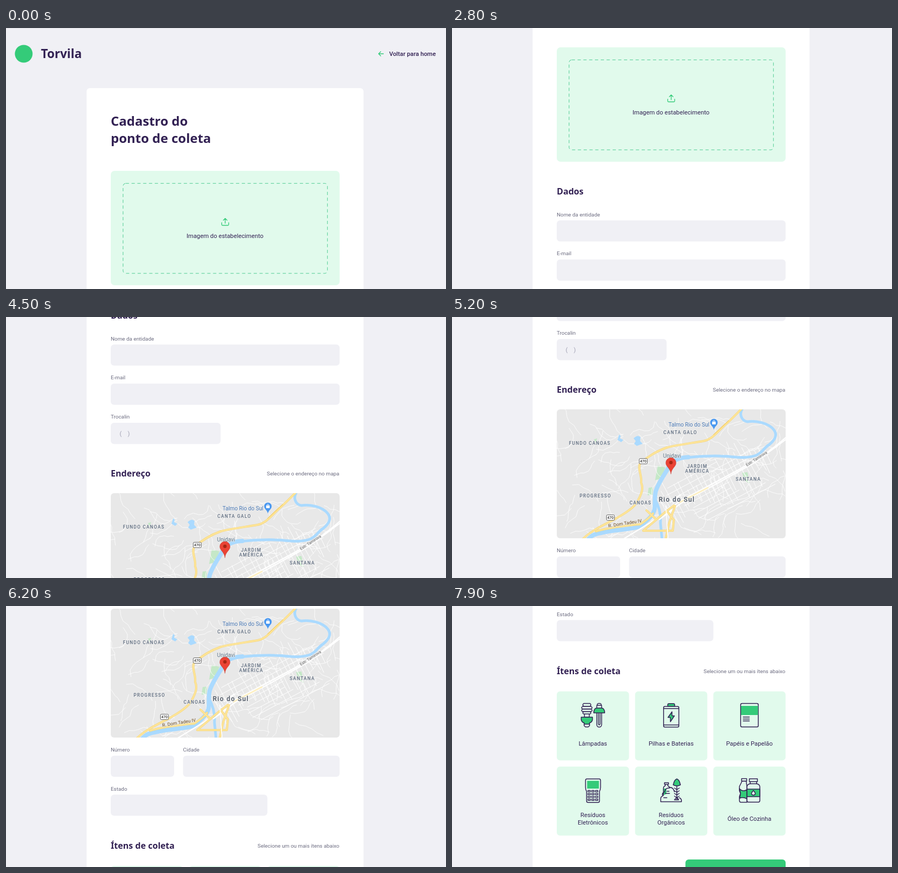
These frames come from a looping animation (819 by 486 pixels, 8 s). An HTML page:

```html
<!DOCTYPE html>
<html lang="pt-BR">
<head>
<meta charset="utf-8">
<title>Cadastro do ponto de coleta</title>
<style>
  html, body { margin: 0; width: 100%; height: 100%; overflow: hidden; background: #f0f0f5; }
  svg { display: block; width: 819px; height: 486px; }
  text { font-family: Roboto, sans-serif; white-space: pre; }
  .title { font: 700 24px "Noto Sans", sans-serif; fill: #322153; }
  .brand { font: 700 22.6px "Noto Sans", sans-serif; fill: #322153; }
  .head { font: 700 16.1px "Noto Sans", sans-serif; fill: #322153; }
  .label { font-size: 9.88px; fill: #6c6c80; }
  .body { font-size: 11.3px; fill: #322153; }
  .mid { text-anchor: middle; }
  .end { text-anchor: end; }
  .field { fill: #f0f0f5; }
  .mint { fill: #e1faec; }
  .ink { fill: none; stroke: #322153; stroke-width: 1.5; stroke-linejoin: round; stroke-linecap: round; }
  .ink .g { fill: #34cb79; }
  .ink .m { fill: #e1faec; }
  .line { fill: none; stroke: #34cb79; stroke-width: 1.3; stroke-linecap: round; stroke-linejoin: round; }
  .map path, .map use { fill: none; stroke-linejoin: round; stroke-linecap: round; }
  .map .park { fill: #c5e8c7; }
  .map .water { stroke: #aadaff; }
  .map .pond { fill: #aadaff; }
  .map .street { stroke: #fff; }
  .map .edge { stroke: #f7d679; stroke-width: 4; }
  .map .road { stroke: #fde59a; stroke-width: 2.6; }
  .map text { text-anchor: middle; paint-order: stroke; stroke: #ececec; stroke-width: 1.6px; stroke-linejoin: round; }
  .area { font-size: 8.4px; font-weight: 500; letter-spacing: 1.25px; fill: #5d6b7e; }
  .city { font-size: 12px; font-weight: 500; letter-spacing: 1.35px; fill: #4b5563; }
  .way { font-size: 8.6px; fill: #6b4a1d; }
  .poi { font-size: 10.2px; fill: #4a79b5; }
  .map .num { font-size: 7px; font-weight: 500; fill: #333; stroke: none; }
</style>
</head>
<body>
<svg viewBox="0 0 819 486">
  <defs>
    <clipPath id="frame"><rect x="195" y="172" width="426" height="240" rx="6"/></clipPath>
    <path id="highway" fill="none" d="M540 170C526 184 520 191 508 201C494 214 484 228 468 231C445 235 420 238 400 243C380 250 362 262 350 273C345 282 354 296 352 308C358 322 350 334 344 346C335 358 318 368 302 377C285 386 258 398 243 414"/>
    <path id="avenues" fill="none" d="M413 351L396 364L356 398H411L413 378L400 361M362 360L380 377M268 399Q300 390 350 386Q366 376 374 366M398 412L404 384L415 352"/>
  </defs>
  <g id="page">
    <rect width="819" height="1" fill="#e5e5ea"/>
    <circle cx="33" cy="48" r="16.5" fill="#34cb79"/>
    <text class="brand" x="65" y="56">Torvila</text>
    <path class="line" d="M702.5 48H693.5M697.5 44L693.5 48L697.5 52"/>
    <text class="body end" x="800" y="52" font-weight="500">Voltar para home</text>

    <rect x="150" y="112" width="515.5" height="1700" rx="6" fill="#fff"/>
    <text class="title" x="195" y="182">Cadastro do</text>
    <text class="title" x="195" y="214.4">ponto de coleta</text>

    <rect class="mint" x="195" y="266" width="426" height="213" rx="7"/>
    <rect x="217.9" y="289.3" width="380.4" height="167.6" rx="5" fill="none" stroke="#4ecb93" stroke-dasharray="6 4.8"/>
    <path class="line" d="M401.5 362.5V366Q401.5 367.5 403 367.5H413Q414.5 367.5 414.5 366V362.5M408 363.5V354.5M404.5 358L408 354.5L411.5 358"/>
    <text class="body mid" x="407.6" y="391">Imagem do estabelecimento</text>

    <text class="head" x="195" y="540">Dados</text>
    <text class="head" x="195" y="834">Endereço</text>
    <text class="head" x="195" y="1312">Ítens de coleta</text>
    <text class="label end" x="620.5" y="831.5">Selecione o endereço no mapa</text>
    <text class="label end" x="620.5" y="1309.5">Selecione um ou mais ítens abaixo</text>
    <g id="form"></g>
    <text x="211.5" y="758" font-size="11.3" fill="#a0a0b2">(    )</text>

    <g class="map" transform="translate(0 693)" clip-path="url(#frame)">
      <rect x="195" y="172" width="426" height="240" fill="#e8e8e8"/>
      <path class="park" d="M383 277L397 280L391 300L378 304ZM366 318L374 317L373 331L364 332ZM540 290L550 289L554 310L545 305ZM264 228L270 226L268 234Z"/>
      <path class="street" id="lanes" stroke-width=".8"/>
      <path class="street" id="blocks" stroke-width="1"/>
      <path class="water" stroke-width="5" d="M541 170C534 180 538 193 550 195C566 192 590 198 599 210C607 220 600 230 590 238C580 244 578 253 565 258C545 265 520 259 500 259C470 258 450 261 430 262"/>
      <path class="water" stroke-width="8" d="M440 261C415 262 408 271 402 282C394 296 384 309 379 325C376 338 379 346 377 358C374 372 360 380 352 389C335 397 300 395 278 402C264 404 258 408 252 416"/>
      <path class="water" stroke-width="5" d="M378 340C386 354 389 370 388 384L391 414"/>
      <path class="pond" d="M338 226Q346 218 351 224L350 231L355 236L344 240L339 236L342 231ZM311 219L314 221L313 226L319 229L315 233L308 229Z"/>
      <path class="street" stroke-width="2.2" d="M623 223C602 241 585 255 562 269L424 343L382 375L318 414M623 227L562 272L426 347L386 377"/>
      <path d="M424 345L476 318" stroke="#fdf0c4" stroke-width="3"/>
      <use href="#highway" class="edge"/><use href="#avenues" class="edge"/>
      <use href="#highway" class="road"/><use href="#avenues" class="road"/>
      <path d="M487 219L515 193" stroke="#f5cf6b" stroke-width="1.2"/>
      <path class="street" stroke-width="1.6" d="M398 352L402 412M406 345L425 331"/>
      <g id="shields"></g>
      <g id="areas"></g>
      <text class="city" x="418.5" y="343.5">Rio do Sul</text>
      <text class="way" transform="translate(322.5 387) rotate(-9)">R. Dom Tadeu IV</text>
      <text class="way" transform="translate(568 266) rotate(-33)" style="font-size:7.2px;fill:#646464">Estr. Tamirova</text>
      <text class="poi" x="441" y="203.7">Talmo Rio do Sul</text>
      <text class="poi" x="409.5" y="261.5" style="fill:#637a8c">Unidavi</text>
      <path style="fill:#4a98f0" d="M487.5 210C486 203 480.5 202 480.5 196.5A7 7 0 0 1 494.5 196.5C494.5 202 489 203 487.5 210Z"/>
      <rect x="484.2" y="195" width="6.6" height="5" rx=".8" fill="#fff"/>
      <path stroke="#fff" d="M486 195V193.5Q487.5 191.5 489 193.5V195"/>
      <path style="fill:#ea4335" stroke="#c5352b" stroke-width=".6" d="M407.5 292C406.5 281 398 279 398 271.5A9.5 9.5 0 0 1 417 271.5C417 279 408.5 281 407.5 292Z"/>
      <circle cx="407.5" cy="271" r="3.2" fill="#a52714"/>
    </g>

    <g id="items"></g>
    <g class="ink" transform="translate(0 1185)">
      <!-- lamps -->
      <path class="m" d="M245 181.5H257Q260 184 257 186.8H245Q242 184 245 181.5ZM243 187H259Q262.5 189.5 259 191.8H243Q239.5 189.5 243 187ZM243 192H259Q262.5 194.5 259 196.6H243Q239.5 194.5 243 192ZM245 196.8H257Q260 199 257 201H245Q242 199 245 196.8ZM246.5 201V207H255.5V201"/>
      <path class="g" d="M240.5 207H261.5V212Q260 217 256 217.5V220H246V217.5Q242 217 240.5 212Z"/>
      <path d="M246 220V223L248.5 225.2H253.5L256 223V220"/>
      <path class="m" d="M269.5 190V185H278.5V190M270.5 185V182.5L272 181.5H276L277.5 182.5V185M269.5 199V221A4.5 4.5 0 0 0 278.5 221V199M272.5 200V220Q274 223 275.5 220V200"/>
      <path class="g" d="M263.8 199Q264 190 270 190H278Q284 190 284.2 199Z"/>
      <!-- battery -->
      <path class="g" d="M401.5 187V184Q401.5 181.8 404 181.8H412Q414.5 181.8 414.5 184V187Z"/>
      <rect class="m" x="393.8" y="187" width="28.5" height="38.5" rx="2.5"/>
      <path d="M394 191H422M394 221.5H422"/>
      <path class="g" d="M409.5 197L402 207.5H406.5V215.5L414 204.5H409.5Z"/>
      <!-- paper -->
      <rect class="m" x="537.3" y="181.5" width="32.8" height="43.8" rx="2.5"/>
      <path stroke="none" class="g" d="M538 186H569.5V203H538Z"/>
      <path d="M542 206.8H553.5M542 210.5H553.5M542 214H553.5"/>
      <!-- terminal -->
      <path class="m" d="M251 322H274Q276.5 322 276.5 325V338Q276.5 342 274.5 345V363Q274.5 365.8 272 365.8H253Q250.5 365.8 250.5 363V345Q248.5 342 248.5 338V325Q248.5 322 251 322Z"/>
      <path stroke="none" class="g" d="M251.5 325.5H273.5V340H251.5Z"/>
      <path id="keys" stroke-width="1.3"/>
      <!-- organic -->
      <path stroke="none" class="g" d="M393.5 340H399V350L393.5 352Z"/>
      <path d="M393.5 353V340Q393.5 336 397 334.5V332H401.5V334.5Q405 336 405 339M395.5 329H403V332H395.5ZM388.5 364.5V359Q388.5 355 392 354Q390 348 396 346Q397 339 403 339Q408 336 412 341L414 346M388.5 364.5H427Q428 359 423 357M400 345H404M397 349H405M394 357H400"/>
      <path class="g" d="M411.8 333Q414 323 418.5 322Q423 323 425.2 333Q418.5 337 411.8 333Z"/>
      <path d="M418.5 335V361M414 339L418.5 342L423 339M414 344L418.5 347L423 344M414 349L418.5 352L423 349M414 354L418.5 357L423 354M414 361L418.5 356L422 361Z"/>
      <!-- oil -->
      <path class="m" d="M540 326L535 336V344L537 349L535 355V362Q535 365.5 538 365.5H549V336L547.5 326Z"/>
      <path class="g" d="M535 340Q541 347 549 342V359Q541 355 535.5 358L537 349Z"/>
      <path class="m" d="M539 321.5H548.5V326H539ZM555 327V331Q549 332 549 337V362Q549 365.3 552 365.3H570Q573 365.3 573 362V337Q573 332 567 331V327ZM553.5 321.8H568.5V327H553.5Z"/>
      <path class="g" d="M549 341H573V355H549Z"/>
      <path class="m" d="M561 343.5Q565 348 564.5 350Q561 354.5 557.5 350Q557 348 561 343.5Z"/>
      <path d="M555 331H567"/>
    </g>
    <rect x="434.5" y="1657" width="186.5" height="40" rx="6" fill="#34cb79"/>
  </g>
</svg>
<script>
  const el = id => document.getElementById(id);
  const fill = (id, list, draw) => { el(id).innerHTML = list.map(draw).join(""); };

  // label, x, label baseline, field width
  fill("form", [
    ["Nome da entidade", 195, 580.5, 426],
    ["E-mail", 195, 653.3, 426],
    ["Trocalin", 195, 726.3, 204.5],
    ["Número", 195, 1131, 118],
    ["Cidade", 329.5, 1131, 291.5],
    ["Estado", 195, 1203.5, 291.5]
  ], ([name, x, y, w]) =>
    `<text class="label" x="${x}" y="${y}">${name}</text>
     <rect class="field" x="${x}" y="${y + 7.7}" width="${w}" height="39.4" rx="6"/>`);

  fill("items", [
    ["Lâmpadas"], ["Pilhas e Baterias"], ["Papéis e Papelão"],
    ["Resíduos", "Eletrônicos"], ["Resíduos", "Orgânicos"], ["Óleo de Cozinha"]
  ], (lines, i) => {
    const x = 195 + (i % 3) * 145.7, y = 1344 + Math.floor(i / 3) * 140;
    const base = y + 101.2 - (lines.length - 1) * 7;
    return `<rect class="mint" x="${x}" y="${y}" width="134.5" height="128.5" rx="6"/>` +
      lines.map((s, n) => `<text class="body mid" x="${x + 67.2}" y="${base + n * 14}">${s}</text>`).join("");
  });

  fill("areas", [
    ["CANTA GALO", 425, 218], ["FUNDO CANOAS", 256.5, 238], ["PROGRESSO", 267, 336],
    ["CANOAS", 351, 349], ["JARDIM", 456.5, 281], ["AMÉRICA", 456.5, 290], ["SANTANA", 551.5, 305]
  ], ([name, x, y]) => `<text class="area" x="${x}" y="${y}">${name}</text>`);

  fill("shields", [[356, 268.5], [295, 373.5]], ([x, y]) =>
    `<rect x="${x - 7.5}" y="${y - 5}" width="15" height="10" rx="2" fill="#fff" stroke="#555" stroke-width=".9"/>
     <text class="num" x="${x}" y="${y + 2.6}">470</text>`);

  let keys = "";
  for (let r = 0; r < 4; r++)
    for (let c = 0; c < 3; c++) keys += `M${253 + c * 7} ${343.5 + r * 5.3}h4.5v2.6h-4.5z`;
  el("keys").setAttribute("d", keys);

  let seed = 47;
  const rand = (a, b) => {
    seed = (seed * 16807) % 2147483647;
    return a + (b - a) * seed / 2147483647;
  };
  const point = (x, y) => x.toFixed(1) + " " + y.toFixed(1);

  // winding country lanes
  let lanes = "";
  for (let i = 0; i < 125; i++) {
    let x = rand(195, 621), y = rand(172, 412), a = rand(0, 6.28);
    lanes += "M" + point(x, y);
    for (let n = 0; n < 6; n++) {
      a += rand(-0.7, 0.7);
      const step = rand(5, 13);
      x += Math.cos(a) * step;
      y += Math.sin(a) * step;
      lanes += "L" + point(x, y);
    }
  }
  el("lanes").setAttribute("d", lanes);

  // town blocks, aligned with the main road
  const town = (s, v) => point(398 + s * 0.88 + v * 0.47, 360 - s * 0.47 + v * 0.88);
  let blocks = "";
  for (let s = 0; s < 225; s += 9)
    blocks += `M${town(s, rand(-55, -8))}L${town(s + rand(-4, 4), rand(8, 62))}`;
  for (let v = -46; v < 62; v += 11)
    blocks += `M${town(rand(0, 70), v)}L${town(rand(120, 225), v)}`;
  el("blocks").setAttribute("d", blocks);

  // scroll strokes: start ms, end ms, resulting offset
  const strokes = [
    [1900, 2500, 163], [2600, 3500, 333], [3500, 3800, 368], [3900, 4800, 558],
    [4800, 5500, 723], [5600, 6500, 877], [6500, 7100, 1037], [7200, 7900, 1185]
  ];
  const scrollAt = t => {
    let y = 0;
    for (const [start, end, to] of strokes) {
      const u = Math.min(1, Math.max(0, (t - start) / (end - start)));
      if (u > 0) y += (to - y) * (1 - (1 - u) ** 2);
    }
    return Math.round(y);
  };

  const page = el("page"), begin = performance.now();
  const draw = () => {
    const t = (performance.now() - begin) % 8000;
    page.setAttribute("transform", `translate(0 ${-scrollAt(Math.floor(t / 100) * 100)})`);
    requestAnimationFrame(draw);
  };
  draw();
</script>
</body>
</html>
```
